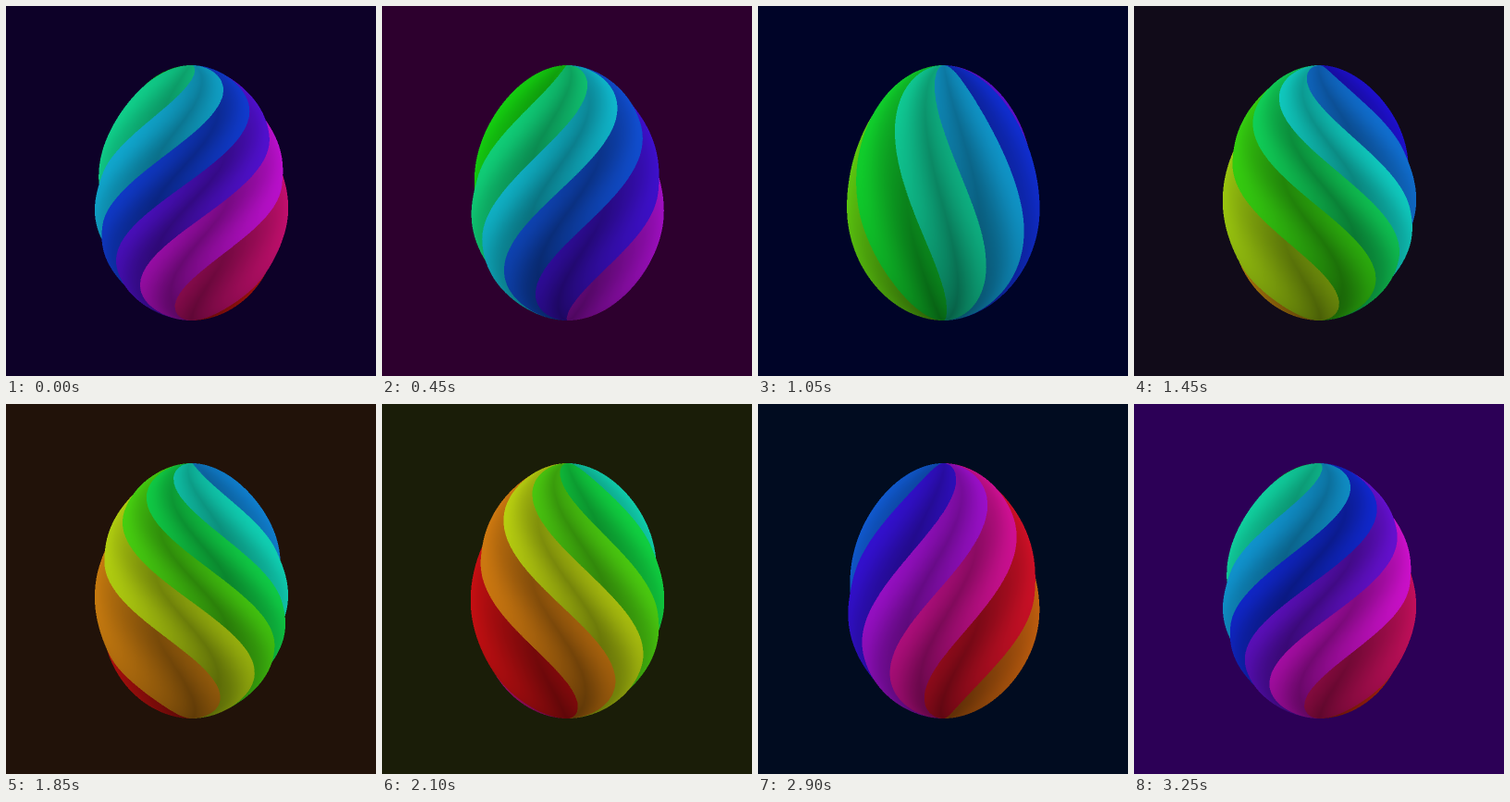
An HTML page with a canvas for the animation above (3.3 s loop, 400 px wide and 400 px high).

```html
<!DOCTYPE html>
<html>
<head>
<meta charset="utf-8">
<title>Twisting egg</title>
<style>
html, body { margin: 0; width: 100%; height: 100%; overflow: hidden; }
canvas { display: block; width: 400px; height: 400px; }
</style>
</head>
<body>
<canvas id="stage" width="800" height="800"></canvas>
<script>
const LOOP = 3300, STEP = 50, SCALE = 2, SIZE = 400 * SCALE;
const TOP = 64, WAIST = 215, BOTTOM = 340, RADIUS = 104.5;
const RAD = Math.PI / 180, HUE_STEP = 34, DEPTH = 0.045;
const LOBES = 4; // per side, with one spare

const ctx = document.getElementById('stage').getContext('2d');
const image = ctx.createImageData(SIZE, SIZE);
const pixels = new Uint32Array(image.data.buffer);

// time, red, green, blue
const backdrop = [
  [0, 13, 1, 40], [450, 45, 0, 46], [1050, 0, 4, 40], [1850, 33, 18, 9],
  [2400, 17, 42, 6], [2900, 1, 12, 32], [3250, 44, 0, 86], [3300, 13, 1, 40]
];

function backdropAt(t) {
  const i = backdrop.findIndex(stop => stop[0] > t);
  const a = backdrop[i - 1], b = backdrop[i];
  const f = (t - a[0]) / (b[0] - a[0]);
  return `rgb(${[1, 2, 3].map(n => Math.round(a[n] + (b[n] - a[n]) * f))})`;
}

function profile(y) {
  const v = (y - WAIST) / (y < WAIST ? WAIST - TOP : BOTTOM - WAIST);
  return RADIUS * Math.pow(Math.max(0, 1 - v * v), 0.52);
}

// Pure hue as three weights in 0..1
function hueWeights(hue) {
  const h = ((hue % 360) + 360) % 360 / 60;
  return [5, 3, 1].map(n => {
    const k = (n + h) % 6;
    return 1 - 0.92 * Math.max(0, Math.min(k, 4 - k, 1));
  });
}

function drawRow(row, twist, palette) {
  const y = (row + 0.5) / SCALE, r = profile(y);
  const slope = profile(y + 0.5) - profile(y - 0.5);
  const flat = 1 / Math.hypot(1, slope);
  const lift = 35 * slope * flat;
  const turn = twist * 0.8 * (y - 176) - 9.5;
  const steps = Math.ceil(r * SCALE * 1.3 * 1.75);

  // Paint from the rim inwards so nearer parts cover farther ones
  for (let i = steps; i >= 0; i--) {
    for (let side = -1; side <= 1; side += 2) {
      const angle = side * 1.75 * i / steps;
      // Lobes widen away from the middle one
      const a = 3.5 * Math.tanh((angle / RAD + turn) / 132);
      const lobe = Math.floor(a), p = Math.PI * (a - lobe - 0.5);
      const x = r * (1 - DEPTH * (1 - Math.cos(p))) * Math.sin(angle);
      const normal = angle + 9 * DEPTH * Math.sin(p);
      const v = 130 + 68 * Math.abs(Math.sin(normal)) * flat + lift;
      const [red, green, blue] = palette[lobe + LOBES];
      pixels[row * SIZE + Math.floor((200.5 + x) * SCALE)] =
        (255 << 24 | v * blue << 16 | v * green << 8 | v * red) >>> 0;
    }
  }
}

function draw(t) {
  const twist = Math.cos(2 * Math.PI * (t - 75) / LOOP);
  const base = 283 - 360 * t / LOOP - 40 * twist;
  const palette = Array.from({ length: 2 * LOBES },
    (_, i) => hueWeights(base + HUE_STEP * (i - LOBES + 0.5)));
  pixels.fill(0);
  for (let row = TOP * SCALE; row < BOTTOM * SCALE; row++) drawRow(row, twist, palette);
  ctx.putImageData(image, 0, 0);
  document.body.style.background = backdropAt(t);
}

let shown = -1;
function tick() {
  const t = Math.floor(performance.now() % LOOP / STEP) * STEP;
  if (t !== shown) draw(shown = t);
  requestAnimationFrame(tick);
}
tick();
</script>
</body>
</html>
```
